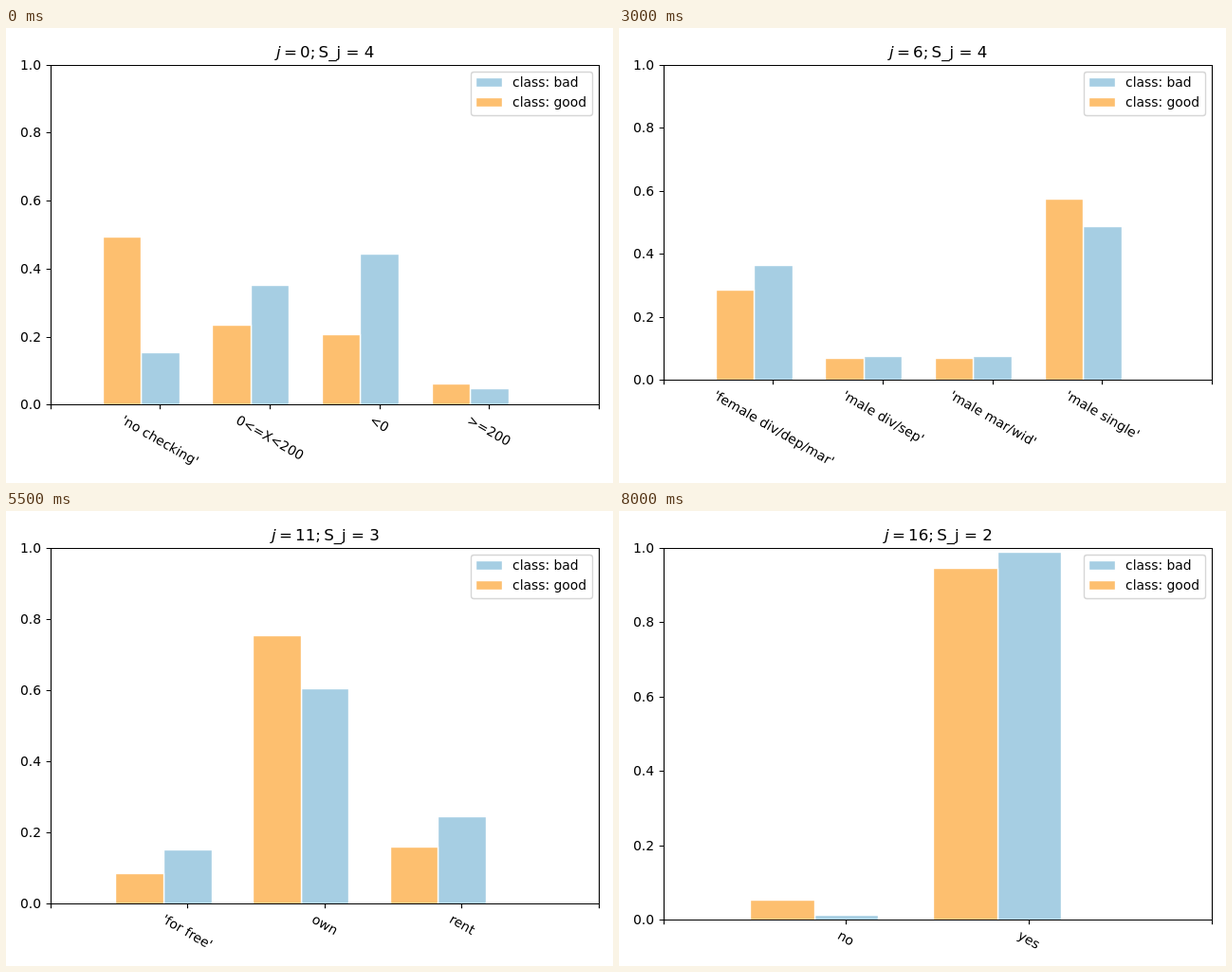
An HTML page that plays this animation: 640x480 px, repeating every 8500 ms.

```html
<!DOCTYPE html>
<html lang="en">
<head>
<meta charset="utf-8">
<title>Class distribution per feature</title>
<style>
html, body { margin: 0; width: 100%; height: 100%; overflow: hidden; background: #fff; }
svg { display: block; width: 640px; height: 480px; }
text { font-family: "DejaVu Sans", sans-serif; font-size: 13.889px; fill: #000; white-space: pre; }
.title { font-size: 16.667px; }
.axis { stroke: #000; stroke-width: 1.11; fill: none; }
.bar { stroke: #fff; stroke-width: 1.39; }
</style>
</head>
<body>
<svg id="stage" viewBox="0 0 640 480"></svg>
<script>
const STEP = 500;
const LEFT = 46.72, RIGHT = 625, TOP = 38.7, CENTER = (LEFT + RIGHT) / 2;
const TICK = 4.86, GAP = 9.72, LINE_H = 14, DESCENT = 3;
const COS = Math.cos(Math.PI / 6), SIN = 0.5;
const BAD = '#a6cee3', GOOD = '#fdbf6f';

// Labels and the key [good, bad] shares; the other labels split what is left of 1.
const charts = [
  ["'no checking'|0<=X<200|<0|>=200",
    { "'no checking'": [.495, .154], '0<=X<200': [.235, .353], '<0': [.208, .445] }],
  ["'all paid'|'critical/other existing credit'|'delayed previously'|'existing paid'|'no credits/all paid'",
    { "'critical/other existing credit'": [.347, .167], "'existing paid'": [.516, .563] }],
  ["'domestic appliance'|'new car'|'used car'|business|education|furniture/equipment|other|radio/tv|repairs|retraining",
    { "'new car'": [.207, .297], "'used car'": [.123, .057], 'furniture/equipment': [.176, .193], 'radio/tv': [.311, .207] }],
  ["'no known savings'|100<=X<500|500<=X<1000|<100|>=1000",
    { "'no known savings'": [.216, .107], '<100': [.551, .723] }],
  ['1<=X<4|4<=X<7|<1|>=7|unemployed',
    { '1<=X<4': [.326, .326], '4<=X<7': [.1985, .135], '<1': [.151, .249], '>=7': [.276, .213] }],
  ['1|2|3|4', { 2: [.241, .207], 4: [.453, .53] }],
  ["'female div/dep/mar'|'male div/sep'|'male mar/wid'|'male single'",
    { "'female div/dep/mar'": [.287, .363], "'male single'": [.574, .487] }],
  ["'co applicant'|guarantor|none",
    { "'co applicant'": [.029, .061], guarantor: [.055, .036] }],
  ['1|2|3|4', { 2: [.301, .323], 4: [.413, .413] }],
  ["'life insurance'|'no known property'|'real estate'|car",
    { "'life insurance'": [.236, .229], "'no known property'": [.121, .226], "'real estate'": [.319, .208] }],
  ['bank|none|stores', { bank: [.117, .19], none: [.843, .747] }],
  ["'for free'|own|rent", { "'for free'": [.085, .151], own: [.755, .604] }],
  ['1|2|3|4', { 1: [.619, .667], 2: [.344, .307] }],
  ["'high qualif/self emp/mgmt'|'unemp/unskilled non res'|'unskilled resident'|skilled",
    { "'high qualif/self emp/mgmt'": [.131, .172], "'unemp/unskilled non res'": [.02, .02], skilled: [.624, .63] }],
  ['1|2', { 1: [.844, .847] }],
  ['none|yes', { none: [.584, .623] }],
  ['no|yes', { no: [.054, .012] }]
];

const stage = document.getElementById('stage');
const pen = document.createElement('canvas').getContext('2d');
pen.font = '13.889px "DejaVu Sans", sans-serif';

const snap = v => Math.floor(v + 0.5) + 0.5;
const textWidth = s => pen.measureText(s).width;
const labelHeight = s => textWidth(s) * SIN + LINE_H * COS;

function shares(labels, key, side) {
  const known = Object.values(key);
  const left = 1 - known.reduce((sum, pair) => sum + pair[side], 0);
  const rest = left / (labels.length - known.length);
  return labels.map(s => key[s] ? key[s][side] : rest);
}

function add(parent, tag, attrs, text) {
  const node = document.createElementNS('http://www.w3.org/2000/svg', tag);
  for (const name in attrs) node.setAttribute(name, attrs[name]);
  if (text !== undefined) node.textContent = text;
  parent.appendChild(node);
  return node;
}

function addBar(g, x0, x1, y0, y1, fill) {
  const x = snap(x0), y = snap(y0);
  add(g, 'rect', { class: 'bar', x, y, width: snap(x1) - x, height: snap(y1) - y, fill });
}

function addTitle(g, j, count) {
  const width = 80.3 + 10.6 * `${j}${count}`.length;
  const t = add(g, 'text', { class: 'title', x: Math.round(CENTER - width / 2), y: 31 });
  add(t, 'tspan', { 'font-style': 'oblique' }, 'j');
  for (const part of ['=', j + ';', 'S_j = ' + count]) add(t, 'tspan', { dx: 3.25 }, part);
}

// Centred under its tick, turned by 30 degrees, lower left corner on a whole pixel.
function addLabel(g, s, tickX, bottom) {
  const w = textWidth(s) / 2, h = LINE_H / 2;
  const x = Math.round(tickX - w * COS - h * SIN);
  const y = Math.round(bottom + GAP + LINE_H * COS);
  add(g, 'text', { y: -DESCENT, transform: `translate(${x} ${y}) rotate(30)` }, s);
}

function addLegend(g, x) {
  add(g, 'rect', {
    x: x + 0.5, y: 46.5, width: 128, height: 46, rx: 2.78,
    fill: '#fff', 'fill-opacity': 0.8, stroke: '#ccc', 'stroke-opacity': 0.8, 'stroke-width': 1.39
  });
  addBar(g, x + 5, x + 33, 52, 62, BAD);
  addBar(g, x + 5, x + 33, 73, 83, GOOD);
  add(g, 'text', { x: x + 44, y: 62 }, 'class: bad');
  add(g, 'text', { x: x + 44, y: 83 }, 'class: good');
}

function drawChart([names, key], j) {
  const g = add(stage, 'g', { visibility: 'hidden' });
  const labels = names.split('|');
  const n = labels.length;
  const good = shares(labels, key, 0), bad = shares(labels, key, 1);
  const unit = (RIGHT - LEFT) / (n + 1);
  const bottom = 465 - GAP - Math.max(...labels.map(labelHeight));
  const xAt = i => LEFT + unit * i;
  const yAt = v => bottom - v * (bottom - TOP);

  labels.forEach((s, i) => {
    const x = i + 1;
    addBar(g, xAt(x - 0.175), xAt(x + 0.175), yAt(bad[i]), bottom, BAD);
    addBar(g, xAt(x - 0.525), xAt(x - 0.175), yAt(good[i]), bottom, GOOD);
    addLabel(g, s, xAt(x), bottom);
  });

  const l = snap(LEFT), r = snap(RIGHT), t = snap(TOP), b = snap(bottom);
  let d = `M${l} ${t}H${r}V${b}H${l}Z`;
  for (let i = 0; i <= n + 1; i++) d += `M${snap(xAt(i))} ${b}v${TICK}`;
  for (let i = 0; i <= 5; i++) {
    const y = yAt(i / 5);
    d += `M${l} ${snap(y)}h${-TICK}`;
    add(g, 'text', { x: 15, y: Math.round(y) + 5 }, (i / 5).toFixed(1));
  }
  add(g, 'path', { class: 'axis', d });

  // The legend moves left when a tall last bar would run under it.
  const crowded = xAt(n + 0.175) > 490 && Math.max(good[n - 1], bad[n - 1]) > 0.85;
  addLegend(g, crowded ? 54 : 490);
  addTitle(g, j, n);
  return g;
}

const views = charts.map(drawChart);
let shown = -1;

function update(ms) {
  const i = Math.floor(ms / STEP) % views.length;
  if (i === shown) return;
  if (shown >= 0) views[shown].setAttribute('visibility', 'hidden');
  views[i].setAttribute('visibility', 'visible');
  shown = i;
}

const start = performance.now();
function tick() {
  update(performance.now() - start);
  requestAnimationFrame(tick);
}
tick();
</script>
</body>
</html>
```
